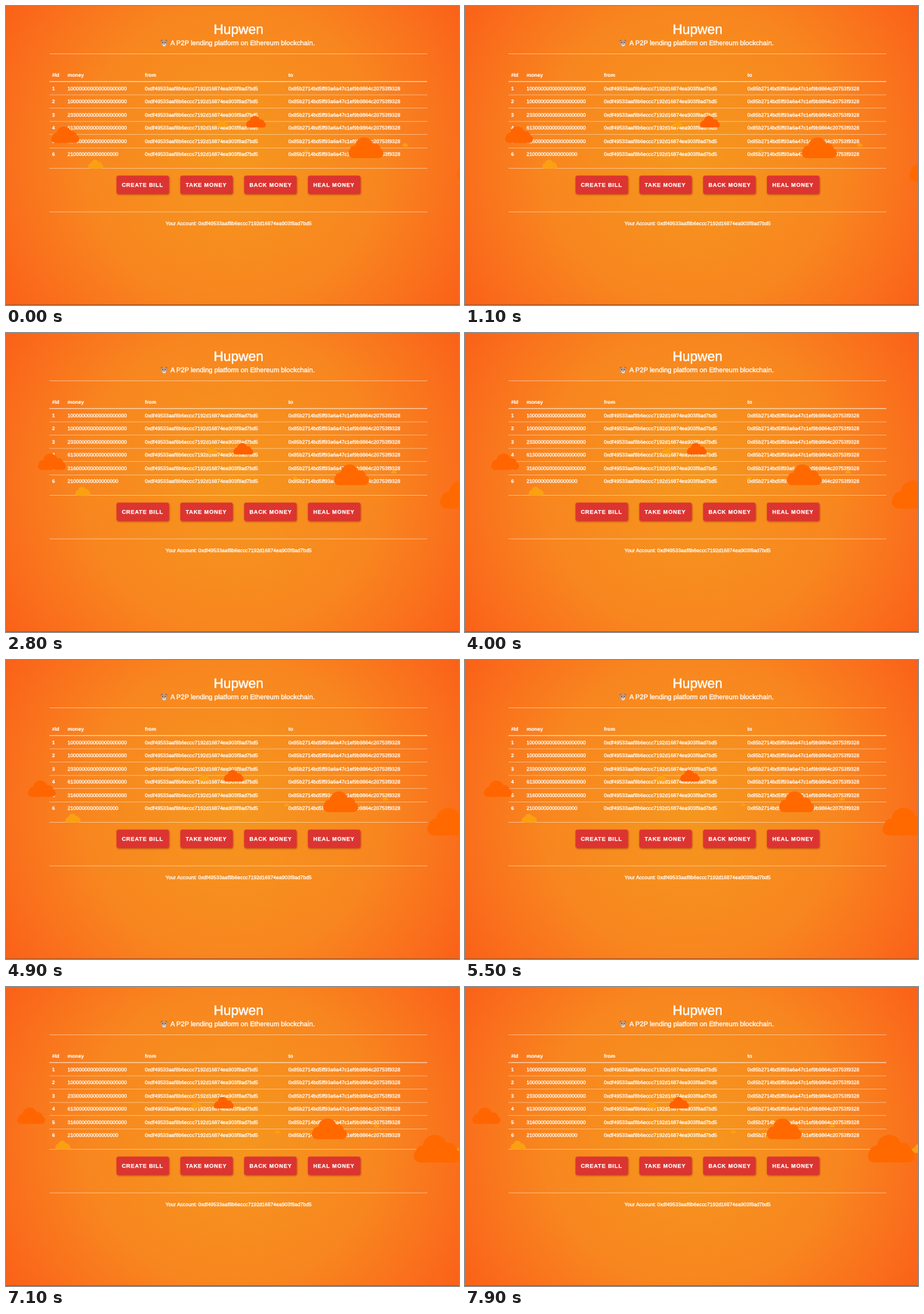
An HTML page that plays this animation: 600 by 397 pixels, repeating every 8000 ms.

```html
<!DOCTYPE html>
<html lang="en">
<head>
<meta charset="utf-8">
<title>Hupwen</title>
<style>
html, body { margin: 0; width: 100%; height: 100%; overflow: hidden; background: #f8861f; }
svg { display: block; width: 600px; height: 397px; }
text { font: 6.72px "Liberation Sans", Arial, sans-serif; fill: #fff; stroke: #fff; stroke-width: .25; text-rendering: geometricPrecision; }
.b { font-weight: bold; stroke-width: .1; }
.btn { font-size: 7.2px; font-weight: bold; letter-spacing: .72px; }
</style>
</head>
<body>
<svg id="stage" viewBox="0 0 600 397">
  <defs>
    <radialGradient id="bg" gradientUnits="userSpaceOnUse" cx="300" cy="198" r="360">
      <stop offset="0" stop-color="#f5971e"/>
      <stop offset=".55" stop-color="#f8861f"/>
      <stop offset=".83" stop-color="#fa6f1c"/>
      <stop offset="1" stop-color="#fa6118"/>
    </radialGradient>
    <filter id="soft" x="-10%" y="-20%" width="120%" height="150%"><feGaussianBlur stdDeviation=".9"/></filter>
    <!-- one cloud, 100 units wide and 59 high -->
    <g id="cloud">
      <rect y="31" width="100" height="28" rx="14"/>
      <circle cx="19" cy="39" r="16"/>
      <circle cx="45" cy="26" r="26"/>
      <circle cx="74" cy="35" r="18"/>
    </g>
  </defs>
  <rect width="600" height="397" fill="url(#bg)"/>
  <rect y="396" width="600" height="1" fill="#b9581c"/>
  <g id="page"></g>
  <g id="sky"></g>
</svg>
<script>
const page = document.getElementById('page');
const sky = document.getElementById('sky');

function add(parent, tag, attrs, content = '') {
  const el = document.createElementNS('http://www.w3.org/2000/svg', tag);
  for (const key in attrs) el.setAttribute(key, attrs[key]);
  el.textContent = content;
  return parent.appendChild(el);
}
const label = (x, y, content, attrs) => add(page, 'text', { x, y, ...attrs }, content);
const centred = (x, y, content, style) => label(x, y, content, { 'text-anchor': 'middle', style });
const rule = (y, alpha, height = .6) =>
  add(page, 'rect', { x: 57.5, y, width: 500.5, height, fill: '#fff', opacity: alpha });
const dot = (cx, cy, r, fill) => add(page, 'circle', { cx, cy, r, fill });

const lender = '0xdf49533aaf8b6eccc7192d16874ea903f8ad7bd5';
const borrower = '0x85b2714bd5ff93a6a47c1ef9b9864c20753f9328';
const columns = [61, 81.5, 184, 374];

// Heading
centred(308, 37.3, 'Hupwen', 'font-size:18px;stroke-width:.45');
label(217.7, 52.2, 'A P2P lending platform on Ethereum blockchain.', { style: 'font-size:8.93px;stroke-width:.3' });
dot(206.6, 46.3, 1.6, '#8d6b5c');
dot(211.8, 46.3, 1.6, '#8d6b5c');
dot(209.3, 49.4, 4.1, '#c39a80');
dot(209.5, 51.4, 2.2, '#eadbd0');
dot(207.6, 48.5, .7, '#4a342d');
dot(211, 48.5, .7, '#4a342d');
dot(209.4, 50.4, .7, '#6b4038');
rule(63, .65);

// Table
['#Id', 'money', 'from', 'to'].forEach((name, i) => label(columns[i], 93.8, name, { class: 'b' }));
rule(99.8, .75, 1);
const amounts = ['1', '1', '233', '613', '316', '21'];
amounts.forEach((digits, i) => {
  const y = 111.5 + 17.58 * i;
  const money = digits.padEnd(i < 5 ? 21 : 18, '0');
  label(columns[0], y, i + 1, { class: 'b' });
  [money, lender, borrower].forEach((cell, k) => label(columns[k + 1], y, cell));
  if (i < 5) rule(y + 6.2, .6);
});
rule(215.1, .65);

// Buttons
['CREATE BILL', 'TAKE MONEY', 'BACK MONEY', 'HEAL MONEY'].forEach((name, i) => {
  const x = 146.4 + 84.5 * i;
  const box = { width: 69.4, height: 24.2, rx: 2.4 };
  add(page, 'rect', { ...box, x: x + .6, y: 226.4, fill: '#a8330f', opacity: .8, filter: 'url(#soft)' });
  add(page, 'rect', { ...box, x, y: 225.2, fill: '#dc3431' });
  label(x + 7, 239.8, name, { class: 'btn' });
});

// Footer
rule(272.9, .65);
centred(308, 290.7, 'Your Account: ' + lender, 'font-size:6.74px');

// Clouds: left edge, top, width, speed in px per second, colour
const amber = '#fba012', orange = '#ff6900';
const clouds = [
  [394.5, 190, 7, 5.4, amber],
  [525, 182, 7.5, 5.35, amber],
  [280, 152.3, 14, 4.95, amber],
  [109, 204, 20, 6.15, amber],
  [640.5, 208.5, 20, 6.15, amber],
  [318, 146, 26, 6, '#ff6000'],
  [60, 160, 37, 6.35, '#ff6500'],
  [453.5, 174.5, 46.5, 6.84, orange],
  [597.5, 196.2, 62.5, 8.08, orange],
].map(([x, y, width, speed, fill]) => ({ x, y, speed, scale: width / 100, el: add(sky, 'use', { href: '#cloud', fill }) }));

function draw() {
  const t = Math.floor(performance.now() % 8000 / 100) / 10;
  for (const { x, y, speed, scale, el } of clouds)
    el.setAttribute('transform', `translate(${x - speed * t} ${y}) scale(${scale})`);
  requestAnimationFrame(draw);
}
draw();
</script>
</body>
</html>
```
